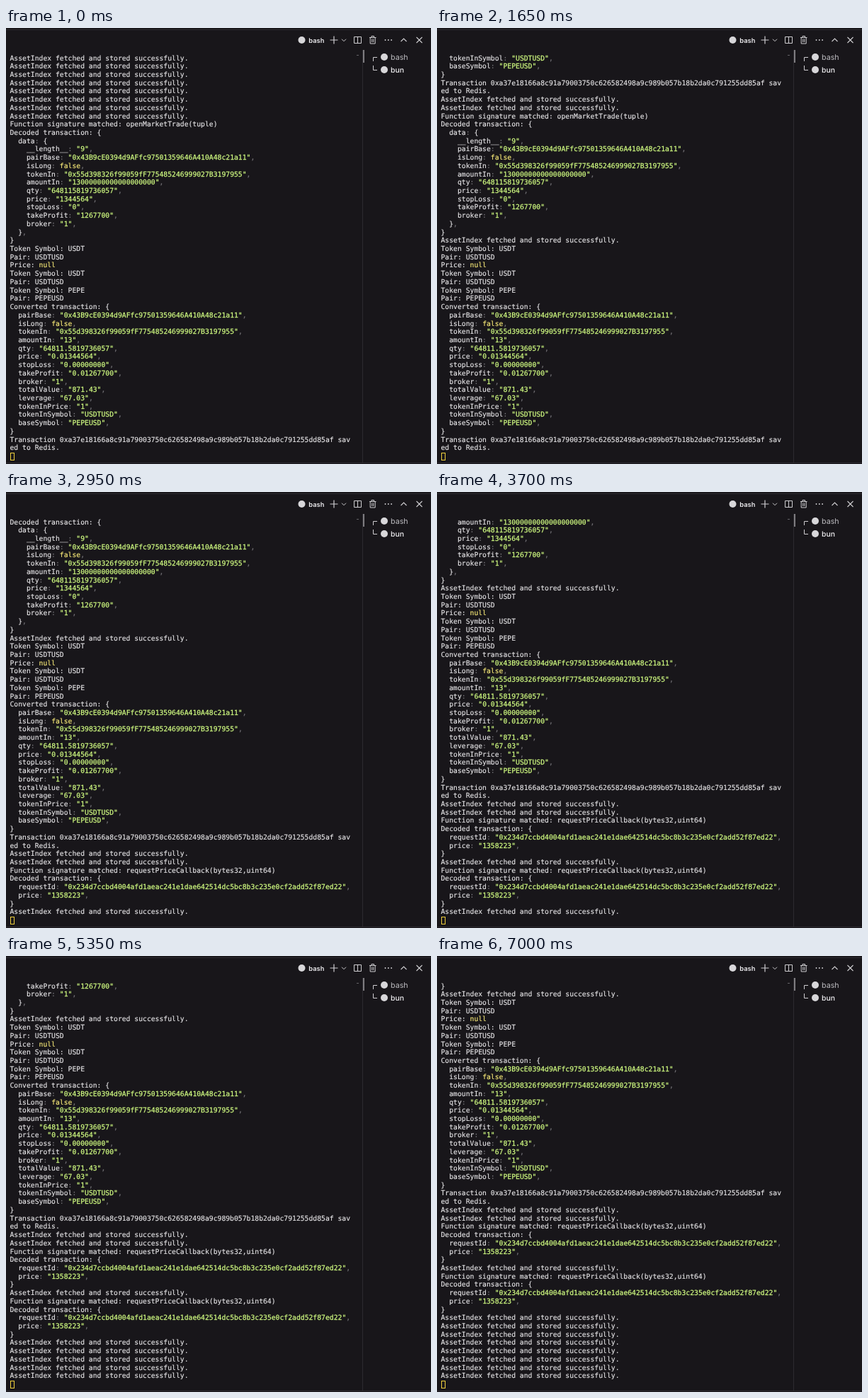
An HTML page that plays this animation: 600x616 px, repeating every 7.05 s.

```html
<!DOCTYPE html>
<html lang="en">
<head>
<meta charset="utf-8">
<style>
  html, body { margin: 0; width: 100%; height: 100%; overflow: hidden; background: #18161a; }
  #log {
    position: absolute; left: 5.5px; top: 37.5px; margin: 0; color: #e6e5e7;
    font: 9.744px/11.72px "DejaVu Sans Mono", monospace;
    font-variant-ligatures: none; text-rendering: geometricPrecision;
    -webkit-text-stroke: .15px;
  }
  #log i { font-style: normal; color: #cffa80; -webkit-text-stroke: .25px; }
  #log b { font-weight: normal; color: #f8ea78; }
  #log u { text-decoration: none; color: #77767a; }
  #log span {
    display: inline-block; box-sizing: border-box; width: 6.5px; height: 11px;
    border: 1px solid #f0d03c; vertical-align: top;
  }
  svg { position: absolute; left: 0; top: 0; }
  text { font-family: Inter, sans-serif; text-rendering: geometricPrecision; }
</style>
</head>
<body>
<pre id="log"></pre>
<svg width="600" height="616" fill="none" stroke="#cfced1">
  <path d="M0 2.5H600M0 614.5H600M503.5 31V614" stroke="#2d2b30"/>
  <path d="M505 31V49" stroke="#a09fa3" stroke-width="1.5"/>
  <path d="M495 38.5h3" stroke="#656468"/>
  <path d="M457.5 17h11M463 11.5v11" stroke-width="1.2"/>
  <path d="M474 15.7l3 3 3-3"/>
  <path d="M491.5 12.5h10v9h-10zM496.5 12.5v9"/>
  <path d="M513 13.5h9.5M516 13.5v-2h3.5v2M514.2 13.5v8.500h7v-8.500M516.7 15.500v4.500M518.8 15.500v4.500"/>
  <path d="M557.5 19l4-4 4 4M579.5 13l8 8M587.5 13l-8 8" stroke-width="1.1"/>
  <path d="M524 41.5H518.5V47M518.5 53V59.5H524"/>
  <g stroke="none" fill="#d8d7da">
    <circle cx="535.5" cy="17" r=".9"/><circle cx="539.8" cy="17" r=".9"/><circle cx="544.1" cy="17" r=".9"/>
    <circle cx="417.5" cy="17" r="5"/>
    <circle cx="534" cy="41" r="5"/>
    <circle cx="534" cy="59" r="5"/>
    <text x="427.3" y="20.5" font-size="9.3" font-weight="600" fill="#eeedf0">bash</text>
    <text x="543" y="44.8" font-size="10.7" fill="#bdbcc0">bash</text>
    <text x="543" y="62.5" font-size="10.4" font-weight="500" fill="#f2f1f4">bun</text>
  </g>
</svg>
<script>
const LOOP = 7050, ROWS = 48, BEAT = 470;
const asset = 'AssetIndex fetched and stored successfully.';
const pair = '  pairBase: "0x43B9cE0394d9AFfc97501359646A410A48c21a11",';
const token = '  tokenIn: "0x55d398326f99059fF775485246999027B3197955",';

const trade = `Function signature matched: openMarketTrade(tuple)
Decoded transaction: {
  data: {
    __length__: "9",
  ${pair}
    isLong: false,
  ${token}
    amountIn: "13000000000000000000",
    qty: "648115819736057",
    price: "1344564",
    stopLoss: "0",
    takeProfit: "1267700",
    broker: "1",
  },
}`;

const usdt = 'Token Symbol: USDT\nPair: USDTUSD';
const pepe = 'Token Symbol: PEPE\nPair: PEPEUSD';
const prices = [usdt, 'Price: null', usdt, pepe].join('\n');

const converted = `Converted transaction: {
${pair}
  isLong: false,
${token}
  amountIn: "13",
  qty: "64811.5819736057",
  price: "0.01344564",
  stopLoss: "0.00000000",
  takeProfit: "0.01267700",
  broker: "1",
  totalValue: "871.43",
  leverage: "67.03",
  tokenInPrice: "1",
  tokenInSymbol: "USDTUSD",
  baseSymbol: "PEPEUSD",
}
Transaction 0xa37e18166a8c91a79003750c626582498a9c989b057b18b2da0c791255dd85af sav
ed to Redis.`;

const callback = `Function signature matched: requestPriceCallback(bytes32,uint64)
Decoded transaction: {
  requestId: "0x234d7ccbd4004afd1aeac241e1dae642514dc5bc8b3c235e0cf2add52f87ed22",
  price: "1358223",
}`;

// Strings, literals and dim punctuation get their own tags.
const paint = line => line.replace(/("[^"]*")|(false|null)|(,$|(?<=^ +\w+):)/g,
  (s, str, lit) => str ? `<i>${s}</i>` : lit ? `<b>${s}</b>` : `<u>${s}</u>`);

const events = [
  ...Array(8).fill([0, asset]), [0, trade], [0, prices], [0, converted],
  [1150, trade], [1450, prices], [1550, converted],
  [2370, callback], [3000, callback],
];
for (let t = 450; t < 7000; t += BEAT) events.push([t, asset]);
events.sort((a, b) => a[0] - b[0]);

const lines = events.flatMap(([time, text]) =>
  text.split('\n').map(line => ({ time, html: paint(line) })));

const log = document.getElementById('log');
let shown = -1;

function draw(now) {
  const t = now % LOOP;
  const count = lines.filter(line => line.time <= t).length;
  if (count !== shown) {
    shown = count;
    const rows = lines.slice(count - ROWS, count).map(line => line.html);
    log.innerHTML = rows.join('\n') + '\n<span></span>';
  }
  requestAnimationFrame(draw);
}
draw(performance.now());
</script>
</body>
</html>
```
